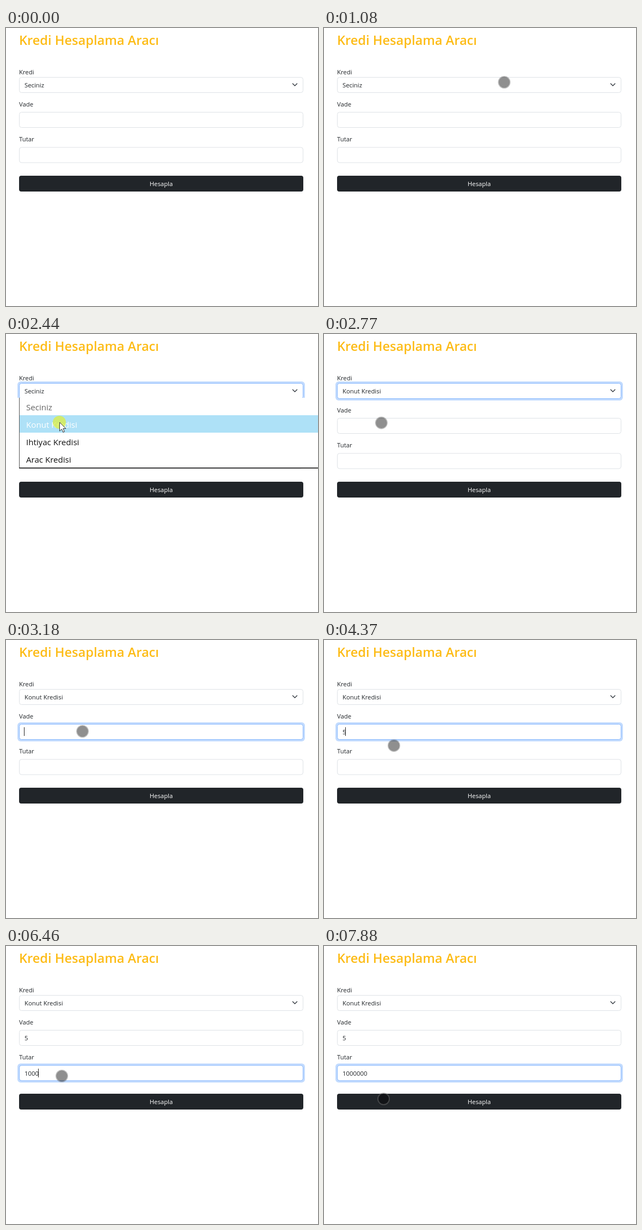
Write an HTML page that moves like this. It is 573x510 px and loops after 8 s.

```html
<!DOCTYPE html>
<html lang="tr">
<head>
<meta charset="utf-8">
<title>Kredi Hesaplama Aracı</title>
<style>
  html, body { margin: 0; width: 100%; height: 100%; overflow: hidden; background: #fff; }
  svg { display: block; font: 11.35px "Open Sans", "Noto Sans", sans-serif; fill: #212529; }
  .title { font-size: 23.6px; font-weight: 600; fill: #fdbc17; }
  .box { fill: #fff; stroke: #dee2e6; }
  .ring { fill: #c2dbfe; visibility: hidden; }
  .focus .box { stroke: #86b7fe; }
  .focus .ring { visibility: visible; }
  #popup { font-size: 15.1px; fill: #111; }
  #caret { fill: #222; }
</style>
</head>
<body>
<svg width="573" height="510" viewBox="0 0 573 510">
  <text class="title" x="24" y="31">Kredi Hesaplama Aracı</text>
  <g id="fields"></g>
  <path d="M526.5 102l4 4 4-4" fill="none" stroke="#343a40" stroke-width="1.4" stroke-linecap="round" stroke-linejoin="round"/>
  <rect id="caret" width="1" height="16"/>
  <rect x="24" y="271" width="522" height="29" rx="4"/>
  <text x="285" y="290" text-anchor="middle" font-weight="500" fill="#fff">Hesapla</text>
  <g id="popup">
    <rect x="20" y="117" width="553" height="130" fill="#fff"/>
    <rect id="hover" x="25" width="548" height="32" fill="#aee1f7"/>
    <rect x="24" y="117" width="1" height="129" fill="#555"/>
    <rect x="24" y="245" width="549" height="1.6" fill="#111"/>
  </g>
  <g id="touch">
    <circle r="10" fill="#000" fill-opacity=".44"/>
    <circle r="10.5" fill="none" stroke="#6e6e6e" stroke-opacity=".45" stroke-width="2"/>
  </g>
  <g id="mouse">
    <circle r="12" fill="#e0f02d" fill-opacity=".68"/>
    <path d="M.5 0v16l3.8-3.5 2.5 5.8 2.6-1.1-2.5-5.7h5z" fill="#fff" stroke="#333"/>
  </g>
</svg>
<script>
const DURATION = 8000, CHAR = 6.45;
const OPEN = 1150, CLOSE = 2700, FOCUS_TERM = 3110, FOCUS_AMOUNT = 4790;
const TERM_KEY = 4170;
const AMOUNT_KEYS = [5390, 5990, 6190, 6460, 6930, 7130, 7400];
const OPTIONS = ["Seciniz", "Konut Kredisi", "Ihtiyac Kredisi", "Arac Kredisi"];

// Pointer path: time, x, y
const PATH = [
  [130, 487.5, 460], [200, 453, 390], [270, 426, 323], [340, 384, 243],
  [480, 338, 160], [550, 327, 131], [750, 331, 99.5], [1150, 331, 99.5],
  [1760, 130, 150], [1960, 130, 150], [2440, 98, 162], [2700, 98, 162],
  [3110, 140.5, 167.5], [4230, 140.5, 167.5], [4370, 128.5, 193.5],
  [4650, 102.5, 238.5], [7400, 102.5, 238.5], [7880, 109.5, 280.5]
];

const $ = id => document.getElementById(id);
const show = (el, on) => el.setAttribute("visibility", on ? "visible" : "hidden");

function add(parent, tag, attrs, text = "") {
  const el = document.createElementNS("http://www.w3.org/2000/svg", tag);
  for (const key in attrs) el.setAttribute(key, attrs[key]);
  el.textContent = text;
  return parent.appendChild(el);
}

function addField(label, labelY, top) {
  add($("fields"), "text", { x: 24, y: labelY }, label);
  const group = add($("fields"), "g", {});
  add(group, "rect", { class: "ring", x: 21, y: top - 3, width: 528, height: 35, rx: 6 });
  add(group, "rect", { class: "box", x: 24.5, y: top + .5, width: 521, height: 28, rx: 4 });
  const value = add(group, "text", { x: 34, y: top + 19 });
  return { group, value, top };
}

const loan = addField("Kredi", 85, 90);
const term = addField("Vade", 144, 154);
const amount = addField("Tutar", 208, 218.5);
OPTIONS.forEach((name, i) => {
  const text = add($("popup"), "text", { x: 37, y: 140 + 32 * i }, name);
  if (i === 0) text.setAttribute("fill", "#666");
});
const optionTexts = $("popup").querySelectorAll("text");

function pointerAt(t) {
  const i = PATH.findIndex(p => p[0] > t);
  if (i < 0) return PATH[PATH.length - 1].slice(1);
  if (i === 0) return PATH[0].slice(1);
  const [t0, x0, y0] = PATH[i - 1], [t1, x1, y1] = PATH[i];
  const k = (t - t0) / (t1 - t0);
  return [x0 + (x1 - x0) * k, y0 + (y1 - y0) * k];
}

function drawCaret(t, field, keys, focusTime) {
  // Typing restarts the blink
  const last = Math.max(focusTime, ...keys.filter(k => k <= t));
  show($("caret"), Math.floor((t - last) / 530) % 2 === 0 && t < 7860);
  $("caret").setAttribute("x", Math.round(33 + CHAR * field.value.textContent.length));
  $("caret").setAttribute("y", Math.round(field.top + 6));
}

function draw(t) {
  const [x, y] = pointerAt(t);
  const open = t >= OPEN && t < CLOSE;
  const focused = t < OPEN ? null : t < FOCUS_TERM ? loan : t < FOCUS_AMOUNT ? term : amount;
  for (const field of [loan, term, amount])
    field.group.setAttribute("class", field === focused ? "focus" : "");

  loan.value.textContent = OPTIONS[t < CLOSE ? 0 : 1];
  term.value.textContent = t < TERM_KEY ? "" : "5";
  amount.value.textContent = "1000000".slice(0, AMOUNT_KEYS.filter(k => k <= t).length);

  if (focused === term) drawCaret(t, term, [TERM_KEY], FOCUS_TERM);
  else if (focused === amount) drawCaret(t, amount, AMOUNT_KEYS, FOCUS_AMOUNT);
  else show($("caret"), false);

  const row = Math.floor((y - 117) / 32);
  $("popup").style.display = open ? "" : "none";
  $("hover").style.display = row > 0 ? "" : "none";
  $("hover").setAttribute("y", 117 + 32 * row);
  optionTexts.forEach((text, i) => {
    if (i) text.setAttribute("fill", i === row ? "#fff" : "#111");
  });

  show($("touch"), t >= 130 && !open);
  show($("mouse"), open);
  for (const id of ["touch", "mouse"])
    $(id).setAttribute("transform", `translate(${x} ${y})`);
}

function loop() {
  draw(performance.now() % DURATION);
  requestAnimationFrame(loop);
}
loop();
</script>
</body>
</html>
```
